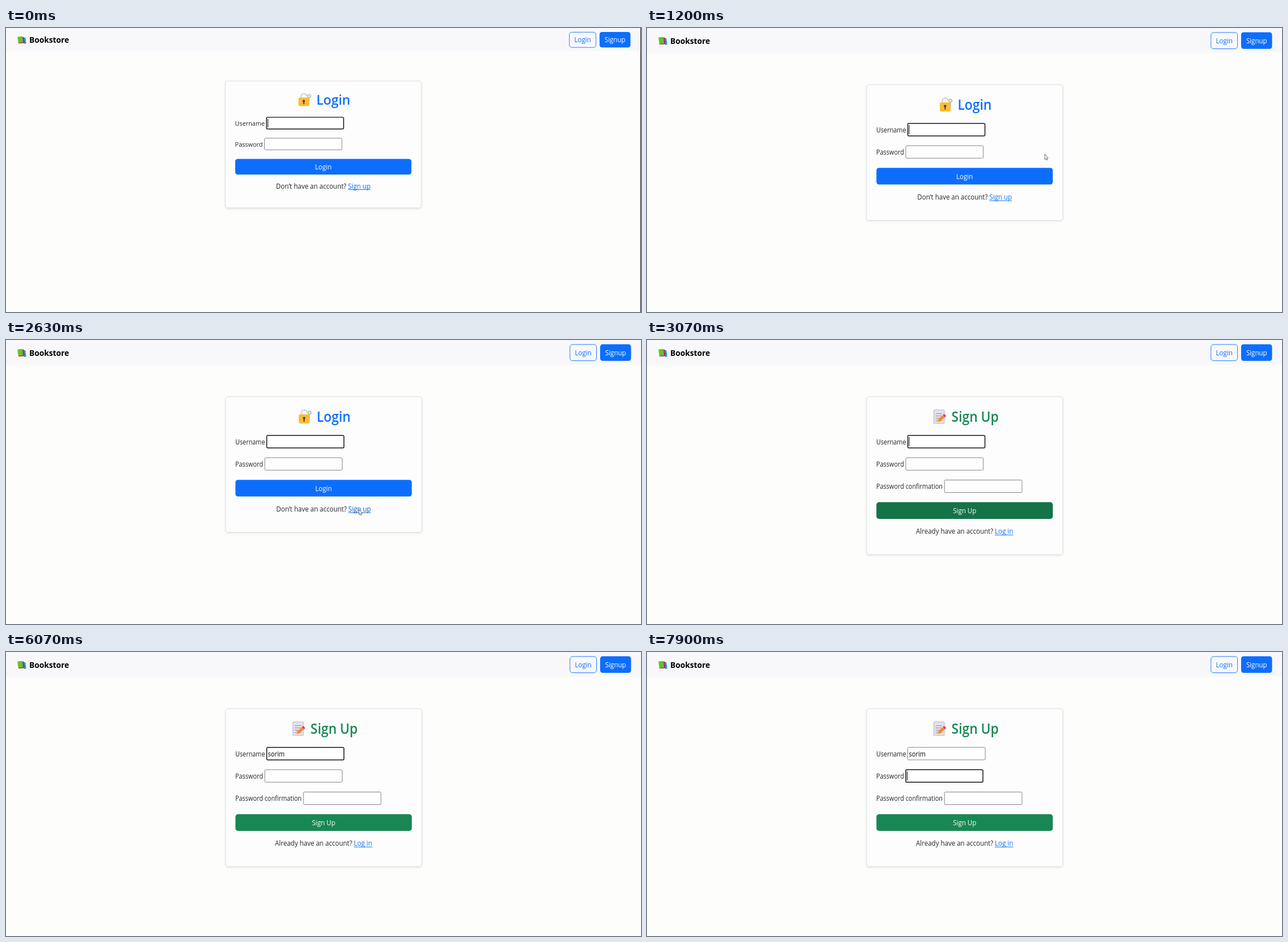
An HTML page with a canvas for the animation above (8000 ms loop, 1119x500 px).

```html
<!DOCTYPE html>
<html lang="en">
<head>
<meta charset="utf-8">
<title>Bookstore</title>
<style>
html, body { margin: 0; width: 100%; height: 100%; overflow: hidden; background: #fdfdfc; }
canvas { display: block; }
</style>
</head>
<body>
<canvas id="stage" width="1119" height="500"></canvas>
<script>
const ctx = document.getElementById('stage').getContext('2d');
const W = 1119, H = 500, LOOP = 8000;
const SX = 0.72, SY = 0.78; // the page is shown slightly squeezed
const LEFT = 404.3, CENTER = W / 2 + 0.2, ROW_TOP = 167.4, ROW = 39.3;
const BLUE = '#0d6efd', INK = '#212529', GREEN = '#198754', PAPER = '#fdfdfc';

const USER = 'sorim';
const SETTLE = 30, OPEN_SIGNUP = 2640, LEAVE_BUTTON = 3220, FOCUS_PASSWORD = 6830;
const BLINK = 530;
const keyTime = i => 4800 + 247 * i - 16 * i * i; // typing speeds up

const FIELDS = [
  { label: 'Username', x: 459 },
  { label: 'Password', x: 455.5 },
  { label: 'Password confirmation', x: 523.8 }
];
const LOGIN = {
  rows: 2, icon: lock, title: 'Login', titleX: 547.5, color: BLUE,
  prompt: 'Don’t have an account? ', link: 'Sign up'
};
const SIGNUP = {
  rows: 3, icon: memo, title: 'Sign Up', titleX: 536.6, color: GREEN,
  prompt: 'Already have an account? ', link: 'Log in'
};
const STOPS = [
  { leave: 530, x: 178, y: 54 },
  { arrive: 830, leave: 1730, x: 701, y: 222 },
  { arrive: 2130, leave: 2140, x: 624, y: 306 },
  { arrive: 2330, leave: OPEN_SIGNUP, x: 622, y: 298 }
];

const clamp = v => Math.max(0, Math.min(1, v));
const ease = v => v * v * (3 - 2 * v);
const mix = (a, b, k) => a + (b - a) * k;

function text(str, x, y, { size = 16, color = INK, weight = 400, align = 'left' } = {}) {
  ctx.save();
  ctx.translate(x, y);
  ctx.scale(SX, SY);
  ctx.font = `${weight} ${size}px "Open Sans", "Noto Sans", sans-serif`;
  ctx.textAlign = align;
  ctx.fillStyle = color;
  ctx.fillText(str, 0, 0);
  ctx.restore();
}

function textWidth(str, size = 16) {
  ctx.font = `${size}px "Open Sans", "Noto Sans", sans-serif`;
  return ctx.measureText(str).width * SX;
}

function box(x, y, w, h, r, fill, stroke, line = 1) {
  ctx.beginPath();
  ctx.roundRect(x, y, w, h, r);
  if (fill) { ctx.fillStyle = fill; ctx.fill(); }
  if (stroke) { ctx.strokeStyle = stroke; ctx.lineWidth = line; ctx.stroke(); }
}

function tilted(cx, cy, w, h, angle, fill) {
  ctx.save();
  ctx.translate(cx, cy);
  ctx.rotate(angle);
  box(-w / 2, -h / 2, w, h, 0.6, fill);
  ctx.restore();
}

function ring(x, y, r, color, from = 0, to = 7) {
  ctx.beginPath();
  ctx.arc(x, y, r, from, to);
  ctx.strokeStyle = color;
  ctx.lineWidth = 2;
  ctx.stroke();
}

function button(str, x, y, w, h, fill) {
  box(x, y, w, h, 4.5, fill);
  text(str, x + w / 2, y + h / 2 + 4.6, { color: '#fff', align: 'center' });
}

function books() {
  ['#1b9de0', '#a8324a', '#68bf30'].forEach((color, i) =>
    tilted(33 - i * 3.9, 23.8 - i, 4 + i * 2.3, 11.5, -0.12, color));
  tilted(26, 28, 8, 1.6, -0.1, '#d83b4c');
}

function lock() {
  ring(525.5, 128.3, 5, '#c9cbd0', Math.PI, 0);
  tilted(520.5, 130, 2, 4, 0, '#c9cbd0');
  tilted(534.6, 134, 2, 8, 0, '#c2c5cb');
  ring(534.8, 128, 2.6, '#bcc0c8');
  box(516, 131, 19, 16, 2.5, '#f9bd32');
  box(523.2, 135.2, 4.2, 4.2, 2.1, '#483a42');
  box(524.3, 138, 2, 5.5, 0.5, '#483a42');
}

function memo() {
  box(505.5, 123, 18.5, 24, 1, '#e6e3ec', '#aaa5b4', 0.8);
  for (let i = 0; i < 4; i++) box(508.5, 129 + i * 4, 12, 1.2, 0, '#9d97aa');
  tilted(512.6, 143.2, 4, 4, -0.7, '#f1c49b');
  tilted(518.4, 138.3, 12.5, 5.3, -0.7, '#fb8b2d');
  tilted(524.3, 133, 3.2, 5.3, -0.7, '#e7324f');
}

function navbar() {
  box(0, 0, W, 43.5, 0, '#f8f8fb');
  books();
  text('Bookstore', 41, 27.8, { size: 19.1, weight: 700, color: '#000' });
  box(993.8, 7.9, 46.8, 28.6, 4.5, null, BLUE, 0.9);
  text('Login', 1017.2, 26.9, { color: BLUE, align: 'center' });
  button('Signup', 1047, 7.5, 54.5, 29.2, BLUE);
}

function card(height) {
  ctx.save();
  ctx.shadowColor = 'rgba(0,0,0,.09)';
  ctx.shadowBlur = 4;
  ctx.shadowOffsetY = 2;
  box(386.8, 99.7, 346, height, 4.5, '#fdfdfd');
  ctx.restore();
  box(386.8, 99.7, 346, height, 4.5, null, '#d6d6da', 0.8);
}

function field({ label, x }, row, value, focused, caretOn) {
  const y = ROW_TOP + row * ROW;
  text(label, LEFT - 0.3, y + 16.1, { size: 15.1 });
  if (focused) box(x + 0.5, y + 0.5, 136, 22, 2, '#fff', '#14141a', 1.5);
  else box(x + 0.5, y + 0.5, 136.5, 22, 1.8, '#fff', '#85858a', 1);
  text(value, x + 2.5, y + 16.1, { size: 15.3, color: '#000' });
  if (focused && caretOn) box(x + 2.5 + textWidth(value, 15.3), y + 3.6, 1, 16, 0, '#000');
}

function footer({ prompt, link }, y, color) {
  const promptWidth = textWidth(prompt), linkWidth = textWidth(link);
  const x = CENTER - (promptWidth + linkWidth) / 2;
  text(prompt, x, y);
  text(link, x + promptWidth, y, { color });
  box(x + promptWidth, y + 1.3, linkWidth, 1, 0, color);
}

function page(form, { value = '', focus = 0, caretOn, shade = 0, linkColor = BLUE }) {
  const buttonTop = ROW_TOP + form.rows * ROW + 0.3;
  card(160.2 + form.rows * ROW);
  form.icon();
  text(form.title, form.titleX, 144, { size: 31.7, weight: 600, color: form.color });
  FIELDS.slice(0, form.rows).forEach((f, i) =>
    field(f, i, i === 0 ? value : '', i === focus, caretOn));
  box(LEFT, buttonTop, 310.8, 29.3, 4.5, form.color);
  button(form.title, LEFT, buttonTop, 310.8, 29.3, `rgba(0,0,0,${shade})`);
  footer(form, buttonTop + 55.8, linkColor);
}

function loginPage(t) {
  page(LOGIN, {
    caretOn: t < SETTLE || Math.floor((t - 500) / BLINK) % 2 === 1,
    linkColor: t > 2250 ? '#0a58ca' : BLUE
  });
}

function signupPage(t) {
  let count = 0;
  while (count < USER.length && t >= keyTime(count)) count++;
  const focus = t >= FOCUS_PASSWORD ? 1 : 0;
  const since = focus ? FOCUS_PASSWORD : count ? keyTime(count - 1) : OPEN_SIGNUP - 30;
  const hover = clamp((t - OPEN_SIGNUP) / 150) * (1 - clamp((t - LEAVE_BUTTON) / 150));
  page(SIGNUP, {
    value: USER.slice(0, count),
    focus,
    caretOn: Math.floor((t - since) / BLINK) % 2 === 0,
    shade: 0.15 * hover
  });
}

function pointer(t) {
  if (t < STOPS[0].leave || t >= OPEN_SIGNUP) return;
  const i = STOPS.findIndex(s => t < s.leave);
  const from = STOPS[i - 1], to = STOPS[i];
  const k = ease(clamp((t - from.leave) / (to.arrive - from.leave)));
  ctx.save();
  ctx.translate(mix(from.x, to.x, k), mix(from.y, to.y, k));
  const arrow = new Path2D('M0 0V9.5L2 7.8 3.3 10.6 4.7 10 3.5 7.2 6 7Z');
  ctx.fillStyle = '#fff';
  ctx.fill(arrow);
  ctx.strokeStyle = '#45454c';
  ctx.lineWidth = 0.8;
  ctx.stroke(arrow);
  ctx.restore();
}

function draw(now) {
  const t = now % LOOP;
  ctx.setTransform(1, 0, 0, 1, 0, 0);
  box(0, 0, W, H, 0, '#202024');
  // the window is slightly smaller before it settles
  if (t < SETTLE) ctx.scale(0.999, 0.936);
  box(0, 0, W, H * 1.1, 0, PAPER);
  navbar();
  if (t < OPEN_SIGNUP) loginPage(t);
  else signupPage(t);
  pointer(t);
}

const start = performance.now();
function tick() {
  draw(performance.now() - start);
  requestAnimationFrame(tick);
}
tick();
</script>
</body>
</html>
```
